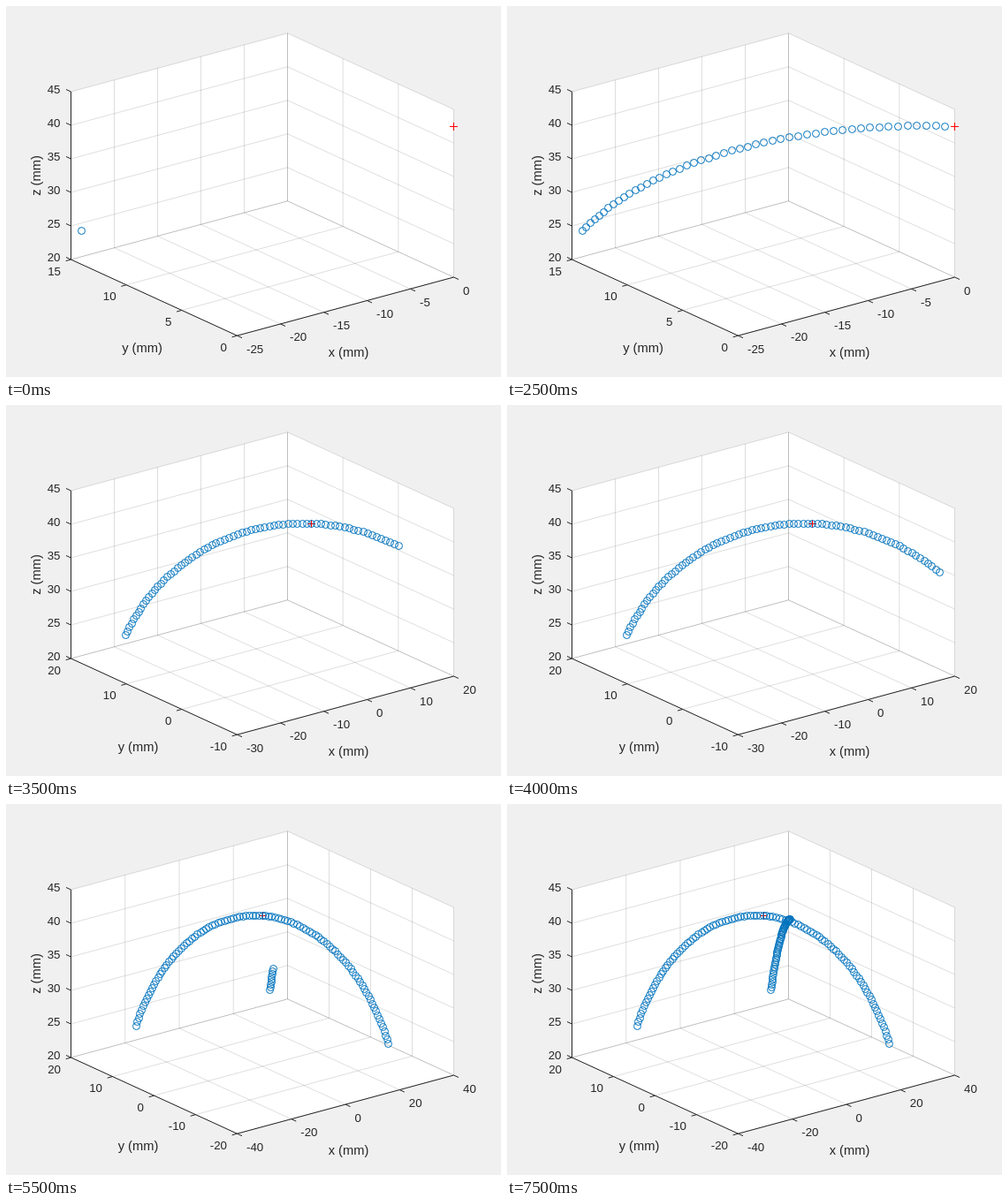
Recreate the animation shown at these times as an HTML page. Size 560 by 420 pixels, loop 8 s.

```html
<!DOCTYPE html>
<html lang="en">
<head>
<meta charset="utf-8">
<title>3D arc plot</title>
<style>
  html, body { margin: 0; width: 100%; height: 100%; overflow: hidden; background: #f0f0f0; }
  svg { display: block; width: 560px; height: 420px; }
  text { font-family: "Liberation Sans", Arial, sans-serif; fill: #262626; }
  .tick { font-size: 13.33px; }
  .title { font-size: 14.67px; text-anchor: middle; }
  .wall { fill: #fff; }
  .grid { stroke: #262626; stroke-opacity: .15; }
  .axis { stroke: #262626; }
  .dots { fill: none; stroke: #0072bd; }
  .cross { stroke: #f00; }
</style>
</head>
<body>
<svg viewBox="0 0 560 420"></svg>
<script>
const svg = document.querySelector("svg");
const LOOP = 8000, STEP = 500;

const Z = { lo: 20, hi: 45, step: 5 };
const VIEWS = [
  { from: 0, x: { lo: -25, hi: 0, step: 5 }, y: { lo: 0, hi: 15, step: 5 }, yTitle: 154 },
  { from: 3000, x: { lo: -30, hi: 10, step: 10 }, y: { lo: -5, hi: 15, step: 5 }, yTitle: 154 },
  { from: 3500, x: { lo: -30, hi: 20, step: 10 }, y: { lo: -10, hi: 20, step: 10 }, yTitle: 149.5 },
  { from: 4500, x: { lo: -40, hi: 40, step: 20 }, y: { lo: -20, hi: 20, step: 10 }, yTitle: 149.5 }
];

// Bending tip: a curved part of constant length followed by a short straight end.
const CURVED = 36.5, STRAIGHT = 5.94, MAX_BEND = 1.5, HALF = 50;
const PLANE = Math.PI / 6;

function tip(i) {
  const bend = MAX_BEND * (i - HALF) / HALF;
  const sinc = bend ? Math.sin(bend) / bend : 1;
  const lift = bend ? (1 - Math.cos(bend)) / bend : 0;
  const r = CURVED * lift + STRAIGHT * Math.sin(bend);
  return [r * Math.cos(PLANE), -r * Math.sin(PLANE), CURVED * sinc + STRAIGHT * Math.cos(bend)];
}

// Second sweep, seen nearly edge-on, in stage coordinates.
const sweep = i => [298.7 + 0.453 * i, 130.4 + 0.032 * (HALF - i) ** 2];

const part = (axis, v) => (v - axis.lo) / (axis.hi - axis.lo);
const place = (u, v, w) => [
  73.5 + 245 * u + 188 * (1 - v),
  287 - 66.2 * u + 86.2 * (1 - v) - 190 * w
];
const project = (view, [x, y, z]) => place(part(view.x, x), part(view.y, y), part(Z, z));
const snap = p => p.map(c => Math.floor(c) + 0.5);

function ticks(axis) {
  const list = [];
  for (let v = axis.lo; v <= axis.hi; v += axis.step) list.push(v);
  return list;
}

const line = (cls, [x1, y1], [x2, y2]) =>
  `<line class="${cls}" x1="${x1}" y1="${y1}" x2="${x2}" y2="${y2}"/>`;
const label = (text, x, y, anchor) =>
  `<text class="tick" x="${x}" y="${y}" text-anchor="${anchor}">${text}</text>`;
const wall = corners => `<polygon class="wall" points="${corners.join(" ")}"/>`;

function axes(view) {
  let out = wall([place(0, 1, 0), place(1, 1, 0), place(1, 0, 0), place(0, 0, 0)]) +
    wall([place(0, 1, 0), place(1, 1, 0), place(1, 1, 1), place(0, 1, 1)]) +
    wall([place(1, 1, 0), place(1, 0, 0), place(1, 0, 1), place(1, 1, 1)]);
  let marks = "";
  const tick = ([x, y], dx, dy) => { marks += line("axis", [x, y], [x + dx, y + dy]); };

  for (const v of ticks(view.x)) {
    const u = part(view.x, v), p = place(u, 0, 0), back = place(u, 1, 0);
    out += line("grid", p, back) + line("grid", back, place(u, 1, 1));
    tick(p, 5.5, 2.5);
    marks += label(v, p[0] + 10.5, p[1] + 19.5, "start");
  }
  for (const v of ticks(view.y)) {
    const t = part(view.y, v), p = place(0, t, 0), back = place(1, t, 0);
    out += line("grid", p, back) + line("grid", back, place(1, t, 1));
    tick(p, -5.8, 1.6);
    marks += label(v, p[0] - 11.5, p[1] + 17.5, "end");
  }
  for (const v of ticks(Z)) {
    const w = part(Z, v), p = place(0, 1, w), corner = place(1, 1, w);
    out += line("grid", p, corner) + line("grid", corner, place(1, 0, w));
    tick(p, -5.5, -2.5);
    marks += label(v, p[0] - 12, p[1] + 2, "end");
  }
  const left = place(0, 1, 0), front = place(0, 0, 0);
  return out + line("axis", left, place(0, 1, 1)) + line("axis", left, front) +
    line("axis", front, place(1, 0, 0)) + marks +
    `<text class="title" x="387.5" y="397">x (mm)</text>
     <text class="title" x="${view.yTitle}" y="392">y (mm)</text>
     <text class="title" transform="translate(38.5 192) rotate(-90)">z (mm)</text>`;
}

function cross([x, y]) {
  return line("cross", [x - 4.5, y], [x + 4.5, y]) + line("cross", [x, y - 4.5], [x, y + 4.5]);
}

function dots(view, count) {
  const total = 2 * HALF + 1;
  let out = "";
  for (let i = 0; i < count; i++) {
    const [x, y] = snap(i < total ? project(view, tip(i)) : sweep(i - total));
    out += `<circle cx="${x}" cy="${y}" r="4"/>`;
  }
  return `<g class="dots">${out}</g>`;
}

let shown = -1;
function draw(now) {
  const step = Math.floor(now % LOOP / STEP);
  if (step !== shown) {
    shown = step;
    const view = VIEWS.filter(v => v.from <= step * STEP).pop();
    svg.innerHTML = axes(view) + cross(snap(project(view, tip(HALF)))) +
      dots(view, Math.max(1, step * 10));
  }
  requestAnimationFrame(draw);
}
draw(performance.now());
</script>
</body>
</html>
```
